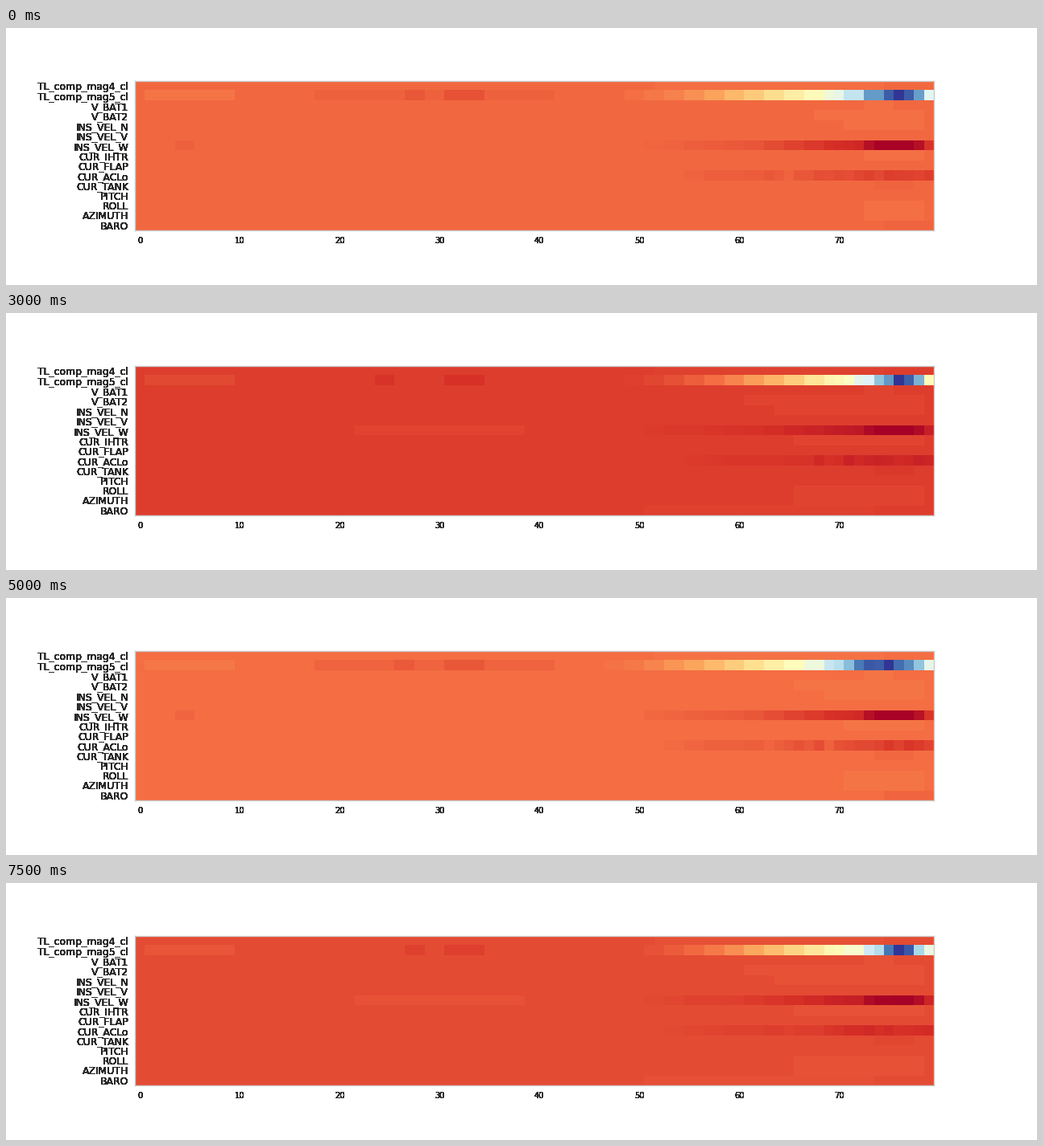
A matplotlib script that plays this animation: 1280 by 320 pixels, repeating every 8000 ms.

```python
import matplotlib.pyplot as plt
import numpy as np
from matplotlib.animation import FuncAnimation

LABELS = ["TL_comp_mag4_cl", "TL_comp_mag5_cl", "V_BAT1", "V_BAT2",
          "INS_VEL_N", "INS_VEL_V", "INS_VEL_W", "CUR_IHTR", "CUR_FLAP",
          "CUR_ACLo", "CUR_TANK", "PITCH", "ROLL", "AZIMUTH", "BARO"]
ROW = {name: i for i, name in enumerate(LABELS)}
COLS, FRAMES = 80, 16
W, H, DPI = 1280, 320, 80

# Background of each step, in percent of the colour scale.
BASE = [19.5, 19.2, 18.8, 18.5, 18.6, 18, 12.4, 17.2,
        17, 13.5, 20, 19.5, 16, 15.5, 15, 14.5]

x = np.arange(COLS)
# Traces move in pairs of columns until the final stretch.
paired = np.where(x < 70, (x - 1) // 2 * 2 + 1.5, x)


def curve(at, *points):
    return np.interp(at, *zip(*points))


def lag(step):
    """How many columns the rise comes late."""
    return curve(step, (0, 0), (3, -2.5), (6, 1.2), (9, 0),
                 (10, -2), (13, 0.9), (15, 1.3))


def field(step):
    """Colour-scale values of one step."""
    rng = np.random.default_rng(step)
    base, late_by = BASE[step], lag(step)
    late = late_by > 1
    dev = np.zeros((len(LABELS), COLS))

    def mark(name, first, last, change):
        dev[ROW[name], int(first):int(last) + 1] += change

    # Faint lifts and dips of the quiet channels.
    start = 66 if late else 73 + late_by
    for name, shift in (("V_BAT2", -5), ("INS_VEL_N", -2), ("CUR_IHTR", 0),
                        ("ROLL", 0), ("AZIMUTH", 0)):
        mark(name, start + shift, 78, 1.2)
    mark("V_BAT1", 73, 75, 1.2)
    mark("TL_comp_mag4_cl", 52, 74, 0.8)
    mark("CUR_TANK", 74, 77, -0.8)
    if late:
        mark("BARO", 51, 73, 0.8)
        mark("INS_VEL_W", 22, 38, 1.2)
    else:
        mark("BARO", 75, 79, -1)
        mark("INS_VEL_W", 4, 5, -1.2)
        mark("TL_comp_mag5_cl", 18, 41, -1.5)
    mark("TL_comp_mag5_cl", 1, 9, 1.7)
    mark("TL_comp_mag5_cl", 31, 34, -2)
    patch = rng.integers(22, 28)
    mark("TL_comp_mag5_cl", patch, patch + 1, -1.5)

    # Strong channels: a rise to the top, a fall to the bottom, a weaker fall.
    at = paired - late_by * np.clip((78 - x) / 4, 0, 1)
    rise = curve(at, (48, 0), (53, 0.04), (57, 0.1), (63, 0.235), (69, 0.41),
                 (72, 0.59), (74, 0.84), (75.5, 1), (77, 0.92), (79, 0.48))
    fall = curve(paired, (50, 0), (55, 0.08), (61, 0.15), (65, 0.3), (70, 0.5),
                 (72, 0.56), (73.5, 0.94), (77, 0.95), (78, 0.8), (79, 0.45))
    dip = curve(paired, (53, 0), (57, 0.08), (63, 0.12), (69, 0.2),
                (72, 0.32), (76, 0.36), (78, 0.42), (79, 0.34))
    rise += rng.normal(0, 0.04, COLS) * (x > 70)
    dip += rng.normal(0, 0.05, COLS) * (x > 62)
    rise[np.argmax(rise)] = 1
    dev[ROW["TL_comp_mag5_cl"]] += (100 - base) * rise
    dev[ROW["INS_VEL_W"]] -= base * fall
    dev[ROW["CUR_ACLo"]] -= base * dip
    return np.clip(base + dev, 0, 100)


fig = plt.figure(figsize=(W / DPI, H / DPI), dpi=DPI, facecolor="white")
ax = fig.add_axes([160 / W, 68 / H, 992 / W, 186 / H])
img = ax.imshow(field(0), cmap="RdYlBu", vmin=0, vmax=100,
                interpolation="nearest", aspect="auto")
ax.set_xticks([])
ax.set_yticks([])
for spine in ax.spines.values():
    spine.set(color="0.8", linewidth=1.25)


def label(text, xy, coords, shift, **style):
    # Overprinting gives the heavy, hard-edged lettering.
    for _ in range(16):
        ax.annotate(text, xy, xycoords=coords, xytext=shift,
                    textcoords="offset points", color="0.15",
                    family="DejaVu Sans", annotation_clip=False, **style)


for i, name in enumerate(LABELS):
    label(name, (0, i), ("axes fraction", "data"), (-7, 0),
          ha="right", va="center_baseline", fontsize=11.1)
for tick in range(0, COLS, 10):
    label(str(tick), (tick, 0), ("data", "axes fraction"), (0, -7),
          ha="center", va="top", fontsize=9)


def update(step):
    img.set_data(field(step))
    return [img]


anim = FuncAnimation(fig, update, frames=FRAMES, interval=500,
                     repeat=True, repeat_delay=0, blit=False)
plt.show()
```
